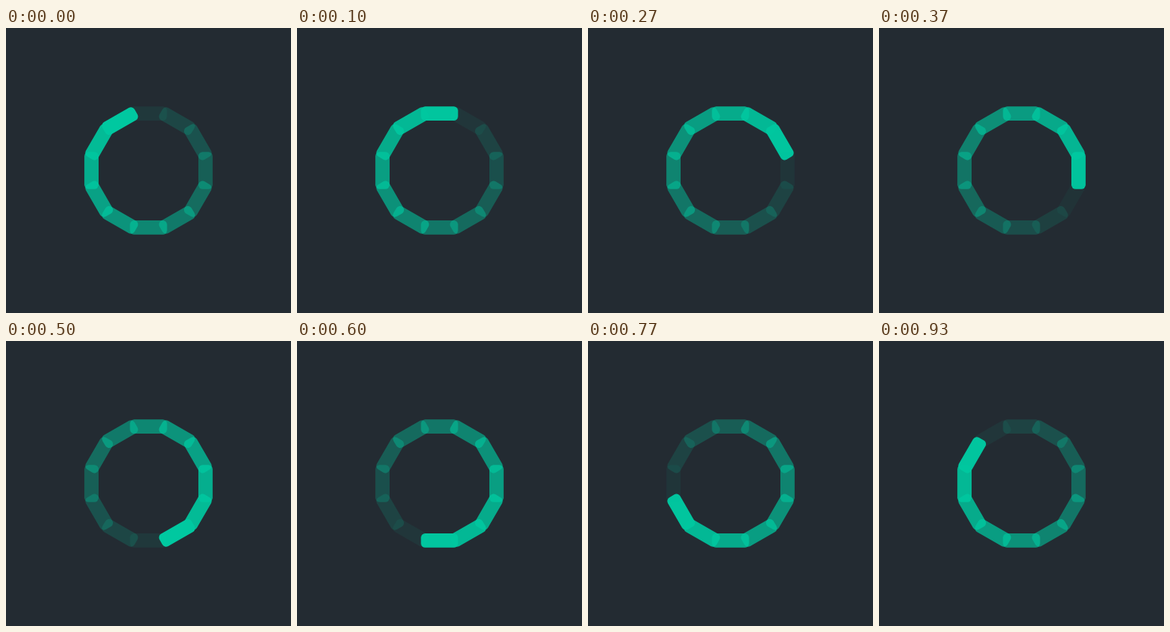
Write an HTML page that moves like this. It is 357 px wide and 357 px high and loops after 1000 ms.

```html
<!DOCTYPE html>
<html lang="en">
<head>
<meta charset="utf-8">
<title>Loading ring</title>
<style>
  html, body { margin: 0; width: 100%; height: 100%; overflow: hidden; background: #232b32; }
  svg { display: block; width: 100vw; height: 100vh; }
</style>
</head>
<body>
<svg viewBox="0 0 100 100"><g id="ring" fill="#00c8a0"></g></svg>
<script>
  const COUNT = 12, FPS = 30, LOOP = 1000;
  const ring = document.getElementById('ring');

  const bars = Array.from({ length: COUNT }, (_, i) => {
    const bar = document.createElementNS('http://www.w3.org/2000/svg', 'rect');
    const attrs = { x: 43.5, y: 27.5, width: 13, height: 5, rx: 1.5,
                    transform: `rotate(${i * 360 / COUNT} 50 50)` };
    for (const name in attrs) bar.setAttribute(name, attrs[name]);
    return ring.appendChild(bar);
  });

  // Ages are whole 60ths of a loop, so the jumps to full opacity stay exact.
  function draw(ms) {
    const step = Math.floor((ms % LOOP + 4) * FPS / LOOP);
    bars.forEach((bar, i) => {
      const age = (2 * step - 5 * (i + 1) + 120) % 60;
      bar.setAttribute('opacity', 1 - age / 60);
    });
  }

  const start = performance.now();
  function tick() {
    draw(performance.now() - start);
    requestAnimationFrame(tick);
  }
  tick();
</script>
</body>
</html>
```
